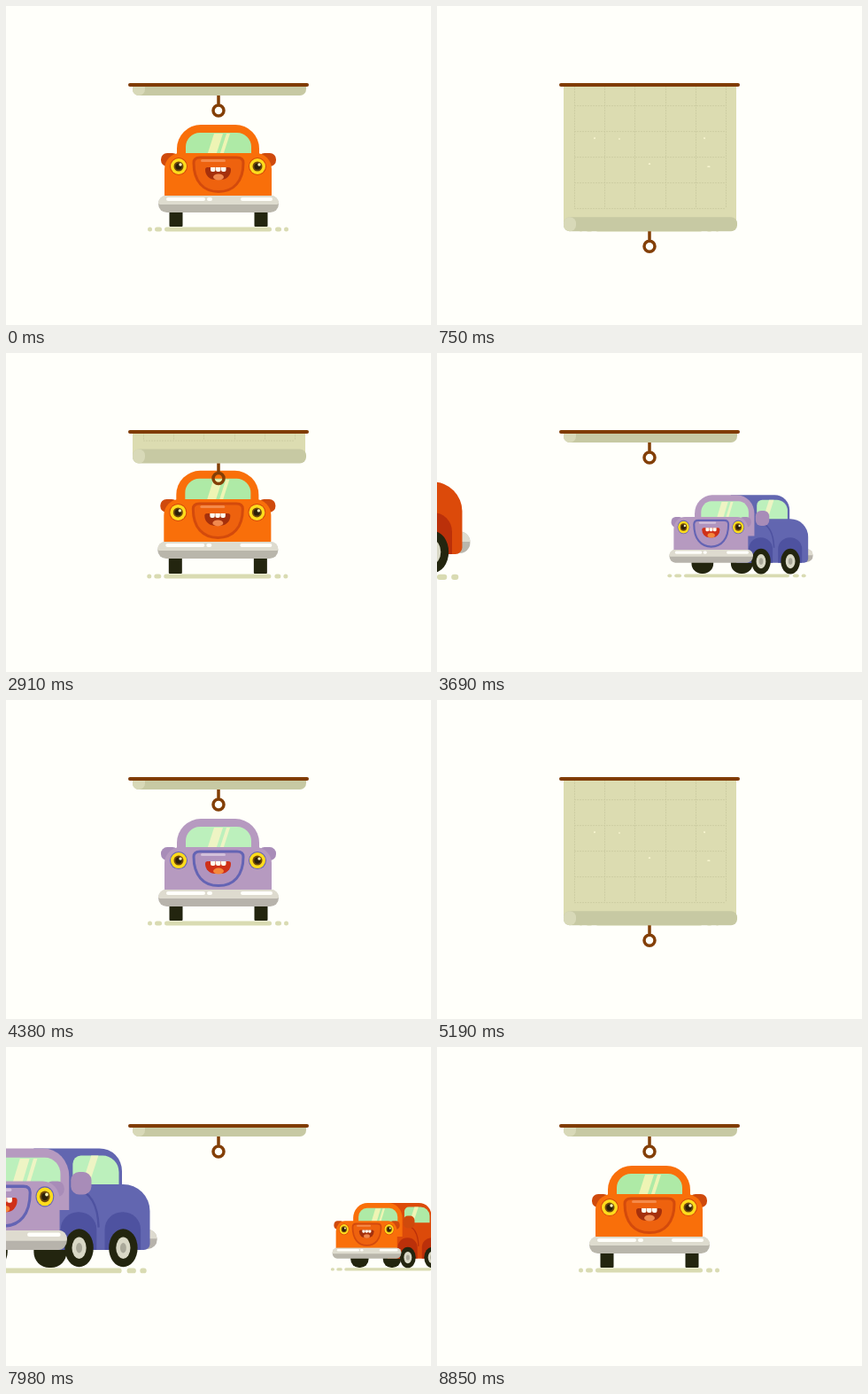
An HTML page with a canvas that plays this animation: 480 px wide and 360 px high, repeating every 8880 ms.

```html
<!DOCTYPE html>
<html lang="en">
<head>
<meta charset="utf-8">
<title>Cars and roller blind</title>
<style>
html, body { margin: 0; width: 100%; height: 100%; overflow: hidden; background: #fffffa; }
canvas { display: block; }
</style>
</head>
<body>
<canvas id="stage" width="480" height="360"></canvas>
<script>
const ctx = document.getElementById('stage').getContext('2d');
const HALF = 4440, GROUND = 249, UP = 101, REST = 258, PULLED = 305;

const ORANGE = {
  body: '#f96f0a', ear: '#cf4a0c', line: '#d34a0c', hood: '#ee620e', shine: '#f58a4a',
  side: '#dc4a0a', fender: '#bb300a', glass: '#aeeaa6', glare: '#eef4b4',
  mouth: '#a5300c', tongue: '#f0894f', bumper: '#dedccf', shade: '#b9b6ab'
};
const PURPLE = {
  body: '#b69ac0', ear: '#a88cb8', line: '#6464b4', hood: '#b094be', shine: '#d2c0da',
  side: '#6266b0', fender: '#4e52a0', glass: '#bcf0bc', glare: '#eef4c4',
  mouth: '#cf3018', tongue: '#f4883c', bumper: '#dedbcf', shade: '#b7b3ab'
};

const clamp = v => Math.min(1, Math.max(0, v));
const sine = v => (1 - Math.cos(Math.PI * clamp(v))) / 2;
const mix = (a, b, k) => a + (b - a) * k;

function box(color, x, y, w, h, r = 0) {
  ctx.fillStyle = color;
  ctx.beginPath();
  ctx.roundRect(x, y, w, h, r);
  ctx.fill();
}

function disc(color, x, y, rx, ry = rx) {
  ctx.fillStyle = color;
  ctx.beginPath();
  ctx.ellipse(x, y, rx, ry, 0, 0, 7);
  ctx.fill();
}

function poly(color, ...points) {
  ctx.fillStyle = color;
  ctx.beginPath();
  for (let i = 0; i < points.length; i += 2) ctx.lineTo(points[i], points[i + 1]);
  ctx.fill();
}

// Runs draw with x moved and squeezed; nothing shows at zero width.
function squeeze(x, sx, draw) {
  if (sx < 0.01) return;
  ctx.save();
  ctx.translate(x, 0);
  ctx.scale(sx, 1);
  draw();
  ctx.restore();
}

function ground(width) {
  const k = width / 160;
  for (const [x, w] of [[-80, 5], [-72, 8], [-61, 121], [64, 7], [74, 5]])
    box('#d9dbb2', x * k, 0.5, w * k, 5, 2.5);
}

function sideWheel(c, x) {
  box(c.fender, x - 18, -53, 35, 37, [17, 17, 0, 0]);
  disc('#23250f', x, -18, 14, 18.5);
  disc('#d9d8c6', x, -18, 7, 10.5);
  disc('#aaa99a', x, -18, 3, 5);
}

function cabinSide(c) {
  box(c.side, -10, -115, 86, 60, [0, 22, 6, 0]);
  box(c.glass, 28, -108, 45, 34, [8, 16, 4, 4]);
  poly(c.glare, 46, -108, 53, -108, 42, -74, 35, -74);
}

function bodySide(c) {
  box(c.shade, 104, -36, 18, 19, 9);
  box(c.bumper, 104, -36, 18, 9, [9, 9, 0, 0]);
  box(c.side, 10, -80, 105, 64, [8, 26, 6, 0]);
  ctx.strokeStyle = c.fender;
  ctx.lineWidth = 2;
  ctx.beginPath();
  ctx.moveTo(42, -76);
  ctx.quadraticCurveTo(64, -72, 65, -38);
  ctx.stroke();
  sideWheel(c, 46);
  sideWheel(c, 89);
}

function cabinFront(c) {
  box(c.body, -47, -115, 93, 60, [27, 27, 0, 0]);
  box(c.glass, -37, -106, 74, 29, [16, 16, 4, 4]);
  poly(c.glare, -5, -105, 5, -105, -4, -77, -14, -77);
  poly(c.glare, 9, -105, 13, -105, 4, -77, 0, -77);
}

function eye(c, x) {
  disc(c.line, x, -68, 10);
  disc('#ffdc1c', x, -68, 9);
  disc('#70480c', x, -68, 5.5);
  disc('#2c200a', x, -68, 3.6);
  disc('#fff6b8', x + 2, -70, 1.7);
}

function hoodPath() {
  ctx.beginPath();
  ctx.moveTo(-28, -72);
  ctx.quadraticCurveTo(-28, -78, -21, -78);
  ctx.lineTo(21, -78);
  ctx.quadraticCurveTo(28, -78, 28, -72);
  ctx.bezierCurveTo(28, -51, 17, -39.5, 0, -39.5);
  ctx.bezierCurveTo(-17, -39.5, -28, -51, -28, -72);
  ctx.closePath();
}

function faceFront(c) {
  box(c.ear, -65, -83, 20, 15, 7);
  box(c.ear, 45, -83, 20, 15, 7);
  box(c.body, -61, -83, 121, 50, [18, 18, 3, 3]);
  hoodPath();
  ctx.fillStyle = c.hood;
  ctx.fill();
  ctx.strokeStyle = c.line;
  ctx.lineWidth = 3;
  ctx.stroke();
  box(c.shine, -20, -76, 28, 3, 1.5);
  box(c.mouth, -15, -67, 29, 14, [3, 3, 12, 12]);
  disc(c.tongue, 0, -56, 6, 3.5);
  for (const x of [-9, -3, 3]) box('#fffdf0', x, -67, 5.5, 5, [0, 0, 2, 2]);
  eye(c, -45);
  eye(c, 44);
}

function bumper(c) {
  box(c.shade, -68, -35, 136, 19, 9.5);
  box(c.bumper, -68, -35, 136, 10, [9.5, 9.5, 2, 2]);
  for (const [x, w] of [[-59, 44], [-13, 6], [25, 36]]) box('#fffffa', x, -33, w, 4, 2);
}

// turn: 0 shows the front, 1 the three-quarter view.
function car(c, x, scale, turn, bob) {
  ctx.save();
  ctx.translate(x, GROUND);
  ctx.scale(scale, scale);
  ground(160 + 44 * turn);
  const face = -38 * turn, narrow = 1 - 0.1 * turn;
  const cabin = -18 * turn, slim = 1 - 0.06 * turn;
  const tyre = 15 + 17 * turn;
  for (const side of [-1, 1])
    box('#23250f', -22 * turn + side * 48 * (1 - 0.4 * turn) - tyre / 2, -32, tyre, 32, 1 + 14 * turn);
  ctx.translate(0, bob);
  // The side slides out from behind the front.
  squeeze(cabin + 20 * slim, turn, () => cabinSide(c));
  squeeze(face + 30 * narrow, turn, () => bodySide(c));
  squeeze(cabin, slim, () => cabinFront(c));
  if (turn > 0.4) box(c.ear, mix(10, 27, turn), -92, 20, 22, 8);
  squeeze(face, narrow, () => { faceFront(c); bumper(c); });
  ctx.restore();
}

function leaving(c, t) {
  const k = Math.max(0, (t - 2800) / 890), x = 240 - 343 * k ** 3;
  if (x < -220) return;
  const bob = t > 2800 ? -1.2 * sine((t - 2800) / 140) : -0.4 * Math.sin(t / 90) ** 2;
  car(c, x, 1 + 0.0008 * (240 - x), sine((t - 2920) / 420), bob);
}

function arriving(c, t) {
  if (t < 3330) return;
  const x = 240 + 400 * (1 - clamp((t - 3330) / 970)) ** 3;
  const settle = Math.max(0, t - 4000);
  const bob = settle ? 2.5 * Math.exp(-settle / 130) * Math.sin(settle / 45) : 0;
  car(c, x, 1 / (1 + 0.003 * (x - 240)), 1 - sine((t - 3690) / 530), bob);
}

// Springs down, gets a tug, then rolls up.
function blindBottom(t) {
  if (t > 2540) return mix(PULLED, UP, sine((t - 2540) / 476));
  const w = Math.PI / 450, a = 0.38 * w;
  const spring = REST - (REST - UP) * Math.exp(-a * t) * (Math.cos(w * t) + 0.38 * Math.sin(w * t));
  return mix(spring, PULLED, sine((t - 2240) / 300));
}

function trace(progress, length, build) {
  if (progress <= 0) return;
  ctx.setLineDash([Math.max(0.1, length * progress), length * 2]);
  ctx.beginPath();
  build();
  ctx.stroke();
}

function blueprint(t) {
  const grow = delay => sine((t - 700 - delay) / 1100);
  const first = grow(0), later = grow(150);
  const tone = clamp((t - 800) / 900);
  ctx.strokeStyle = `rgb(${mix(248, 182, tone)},${mix(246, 184, tone)},${mix(208, 126, tone)})`;
  ctx.lineWidth = 1.6;
  ctx.lineCap = 'round';
  for (const side of [-1, 1]) {
    ctx.save();
    ctx.translate(240, 0);
    ctx.scale(side, 1);
    trace(first, 48, () => {
      ctx.moveTo(62, -105);
      ctx.quadraticCurveTo(69, -101, 69, -90);
      ctx.lineTo(69, -73);
    });
    trace(first, 20, () => {
      ctx.moveTo(62, -105);
      ctx.quadraticCurveTo(58, -111, 48, -111);
    });
    trace(side < 0 ? first : later, 52, () => ctx.arc(42, -104, 8, Math.PI, 3 * Math.PI));
    trace(first, 90, () => {
      ctx.moveTo(0, -76);
      ctx.arc(0, -104, 28, Math.PI / 2, -0.4, true);
      ctx.lineTo(22, -121);
      ctx.lineTo(0, -121);
    });
    trace(later, 70, () => {
      ctx.moveTo(68, -53);
      ctx.lineTo(68, -39);
      ctx.quadraticCurveTo(68, -36, 65, -36);
      ctx.lineTo(54, -36);
      ctx.quadraticCurveTo(51, -36, 51, -39);
      ctx.lineTo(51, -53);
    });
    trace(later, 90, () => {
      ctx.moveTo(52, -112);
      ctx.bezierCurveTo(52, -142, 46, -153, 20, -153);
      ctx.lineTo(0, -153);
    });
    trace(later, 110, () => {
      ctx.moveTo(0, -117);
      ctx.lineTo(40, -117);
      ctx.bezierCurveTo(42, -137, 36, -144, 20, -144);
      ctx.lineTo(0, -144);
    });
    ctx.restore();
  }
  trace(first, 330, () => {
    ctx.moveTo(306, -73);
    ctx.arc(306, -63, 10, -Math.PI / 2, Math.PI / 2);
    ctx.lineTo(174, -53);
    ctx.arc(174, -63, 10, Math.PI / 2, -Math.PI / 2);
    ctx.lineTo(306, -73);
  });
  ctx.setLineDash([]);
}

function blind(t) {
  const bottom = blindBottom(t);
  ctx.save();
  ctx.beginPath();
  ctx.rect(0, 89, 480, 271);
  ctx.clip();
  ctx.translate(0, bottom);
  box('#dcdcb1', 143, -240, 195, 232);
  ctx.strokeStyle = '#cdcda2';
  ctx.lineWidth = 1;
  ctx.setLineDash([2, 1]);
  ctx.beginPath();
  for (let i = 0; i < 6; i++) {
    const x = Math.round(155 + 34.2 * i) + 0.5;
    ctx.moveTo(x, -230);
    ctx.lineTo(x, -26);
  }
  for (let y = -25.5; y > -230; y -= 29) {
    ctx.moveTo(155, y);
    ctx.lineTo(326, y);
  }
  ctx.stroke();
  ctx.setLineDash([]);
  blueprint(t);
  box('#c7c9a3', 143, -16, 196, 16, 7);
  box('#d8d9b8', 143, -16, 14, 16, 7);
  ctx.strokeStyle = '#833f06';
  ctx.lineCap = 'butt';
  ctx.lineWidth = 3.5;
  ctx.beginPath();
  ctx.moveTo(240, 0);
  ctx.lineTo(240, 11);
  ctx.moveTo(246, 17);
  ctx.arc(240, 17, 6, 0, 6.29);
  ctx.stroke();
  ctx.restore();
  box('#803c04', 138, 87, 204, 4, 2);
}

function draw(now) {
  const time = now % (2 * HALF), t = time % HALF;
  const [here, next] = time < HALF ? [ORANGE, PURPLE] : [PURPLE, ORANGE];
  ctx.fillStyle = '#fffffa';
  ctx.fillRect(0, 0, 480, 360);
  arriving(next, t);
  leaving(here, t);
  blind(t);
}

const start = performance.now();
function tick() {
  draw(performance.now() - start);
  requestAnimationFrame(tick);
}
tick();
</script>
</body>
</html>
```
